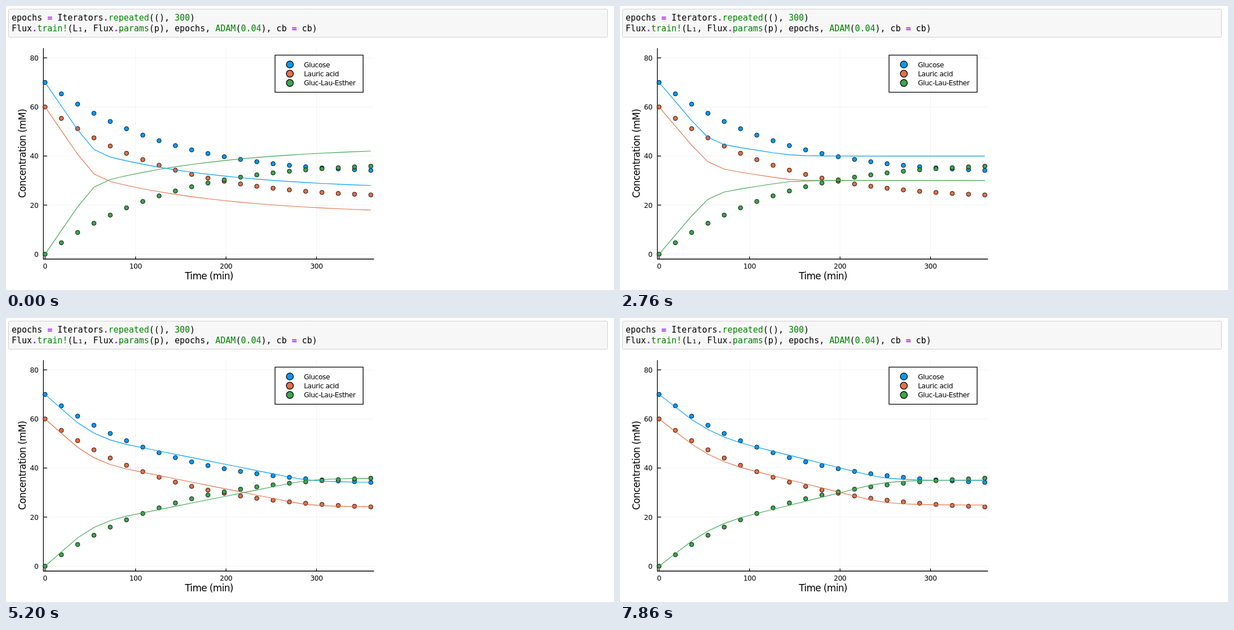
Recreate the animation shown at these times as an HTML page with a canvas. Size 1078x505 px, loop 7990 ms.

```html
<!DOCTYPE html>
<html lang="en">
<head>
<meta charset="utf-8">
<title>Training a reaction model</title>
<style>
  html, body { margin: 0; width: 100%; height: 100%; overflow: hidden; background: #fff; }
  canvas, svg { position: absolute; left: 0; top: 0; width: 1078px; height: 505px; }
  text { font: 12.3px "DejaVu Sans", sans-serif; letter-spacing: -0.036em; fill: #000; }
  .code text { font: 15px "DejaVu Sans Mono", monospace; letter-spacing: 0; white-space: pre; }
  .op { fill: #aa22ff; font-weight: bold; }
  .fn { fill: #008000; }
  .label { font-size: 16.9px; text-anchor: middle; }
</style>
</head>
<body>
<canvas id="plot"></canvas>
<svg id="texts" viewBox="0 0 1078 505">
  <g class="code">
    <text x="10" y="26">epochs <tspan class="op">=</tspan> Iterators<tspan class="op">.</tspan><tspan class="fn">repeated</tspan>((), <tspan class="fn">300</tspan>)</text>
    <text x="10" y="45">Flux<tspan class="op">.</tspan><tspan class="fn">train!</tspan>(L₁, Flux<tspan class="op">.</tspan><tspan class="fn">params</tspan>(p), epochs, <tspan class="fn">ADAM</tspan>(<tspan class="fn">0.04</tspan>), cb <tspan class="op">=</tspan> cb)</text>
  </g>
  <text class="label" x="360" y="486">Time (min)</text>
  <text class="label" transform="translate(34.8 262.3) rotate(-90)">Concentration (mM)</text>
</svg>
<script>
const W = 1078, H = 505, LOOP = 7990;
const SAMPLES = 20, REDRAW = 80;
const px = min => 69.3 + min * 1.6042;
const py = mM => 441.3 - mM * 4.363;

// Every concentration follows from the amount of product formed.
const species = [
  { name: 'Glucose', color: '#009afa', amount: e => 70 - e },
  { name: 'Lauric acid', color: '#e26f46', amount: e => 60 - e },
  { name: 'Gluc-Lau-Esther', color: '#3da44d', amount: e => e }
];

// Measured product at sample s, one sample every 18 minutes
const measured = s => 37 * (1 - Math.exp(-(0.1325 * s + 0.00205 * s * s)));

// Learned rate = fast phase + slow phase; each has a top speed, a gain and an end level.
const stages = [
  { at: 0,    fast: [8.05, 1, 30.6],    slow: [1.6, 0.12, 44] },
  { at: 870,  fast: [9.5, 1.5, 28.65],  slow: [0, 1, 28.65] },
  { at: 1940, fast: [8.7, 1.28, 28.7],  slow: [0, 1, 28.7] },
  { at: 3570, fast: [4.8, 0.55, 23.5],  slow: [2.1, 1, 31.35] },
  { at: 4570, fast: [4.6, 0.45, 20.8],  slow: [1.28, 0.66, 35.7] },
  { at: 5830, fast: [4.4, 0.38, 20.6],  slow: [1.38, 0.75, 36] },
  { at: 7860, fast: [3.5, 0.28, 21],    slow: [1.65, 0.7, 35.1] }
];

const mix = (a, b, u) => a.map((v, i) => v + (b[i] - v) * u);
const phase = ([top, gain, end], e) => Math.min(top, gain * Math.max(0, end - e));

// Training parameters drift between stages, in discrete redraws.
function modelAt(t) {
  let k = 0;
  while (k < stages.length - 2 && stages[k + 1].at <= t) k++;
  const a = stages[k], b = stages[k + 1], span = b.at - a.at;
  const redraws = Math.round(span / REDRAW);
  const u = Math.min(1, Math.floor((t - a.at) / span * redraws) / redraws);
  return { fast: mix(a.fast, b.fast, u), slow: mix(a.slow, b.slow, u) };
}

function predict({ fast, slow }) {
  const out = [0], sub = 24;
  let e = 0;
  for (let s = 1; s <= SAMPLES; s++) {
    for (let j = 0; j < sub; j++) e += (phase(fast, e) + phase(slow, e)) / sub;
    out.push(e);
  }
  return out;
}

const canvas = document.getElementById('plot');
const ctx = canvas.getContext('2d');
const ratio = window.devicePixelRatio || 1;
canvas.width = W * ratio;
canvas.height = H * ratio;
ctx.scale(ratio, ratio);

function line(points, color, width) {
  ctx.beginPath();
  points.forEach(([x, y]) => ctx.lineTo(x, y));
  ctx.strokeStyle = color;
  ctx.lineWidth = width;
  ctx.stroke();
}

function paint(fill, stroke, width) {
  ctx.fillStyle = fill;
  ctx.fill();
  ctx.strokeStyle = stroke;
  ctx.lineWidth = width;
  ctx.stroke();
}

function box(x, y, w, h, r, fill, stroke, width) {
  ctx.beginPath();
  ctx.roundRect(x, y, w, h, r);
  paint(fill, stroke, width);
}

function dot(x, y, r, color, width) {
  ctx.beginPath();
  ctx.arc(x, y, r, 0, 2 * Math.PI);
  paint(color, '#000', width);
}

const xTicks = [0, 100, 200, 300], yTicks = [0, 20, 40, 60, 80];
const left = 66.3, right = 652.5, top_ = 75, bottom = 450;

function drawAxes() {
  const grid = 'rgba(0,0,0,0.05)';
  for (const v of xTicks) line([[px(v), top_], [px(v), bottom]], grid, 1);
  for (const v of yTicks) line([[left, py(v)], [right, py(v)]], grid, 1);
  line([[left, top_], [left, bottom], [right, bottom]], '#000', 1.3);
  for (const v of xTicks) line([[px(v), bottom], [px(v), bottom - 4.4]], '#000', 1.3);
  for (const v of yTicks) line([[left, py(v)], [left + 6.7, py(v)]], '#000', 1.3);
}

const legendY = i => 104 + i * 16.4;

function drawLegend() {
  box(477, 87.3, 156.2, 66, 0, '#fff', '#000', 1.3);
  species.forEach((sp, i) => dot(503.3, legendY(i), 6.2, sp.color, 1.3));
}

function addLabels() {
  const svg = document.getElementById('texts');
  const add = (value, x, y, anchor) => {
    const el = document.createElementNS(svg.namespaceURI, 'text');
    el.setAttribute('x', x);
    el.setAttribute('y', y);
    el.setAttribute('text-anchor', anchor);
    el.textContent = value;
    svg.append(el);
  };
  for (const v of xTicks) add(v, px(v), 466.6, 'middle');
  for (const v of yTicks) add(v, 57.3, py(v) + 4.5, 'end');
  species.forEach((sp, i) => add(sp.name, 528.2, legendY(i) + 4.5, 'start'));
}

function draw(t) {
  ctx.fillStyle = '#fff';
  ctx.fillRect(0, 0, W, H);
  box(4.5, 5.5, 1062, 50, 2, '#f7f7f7', '#cfcfcf', 1);
  drawAxes();
  for (const { color, amount } of species) {
    for (let s = 0; s <= SAMPLES; s++) dot(px(s * 18), py(amount(measured(s))), 3.8, color, 0.9);
  }
  const fit = predict(modelAt(t));
  for (const { color, amount } of species) {
    line(fit.map((e, s) => [px(s * 18), py(amount(e))]), color, 1.15);
  }
  drawLegend();
}

function tick() {
  draw(performance.now() % LOOP);
  requestAnimationFrame(tick);
}

addLabels();
tick();
</script>
</body>
</html>
```
